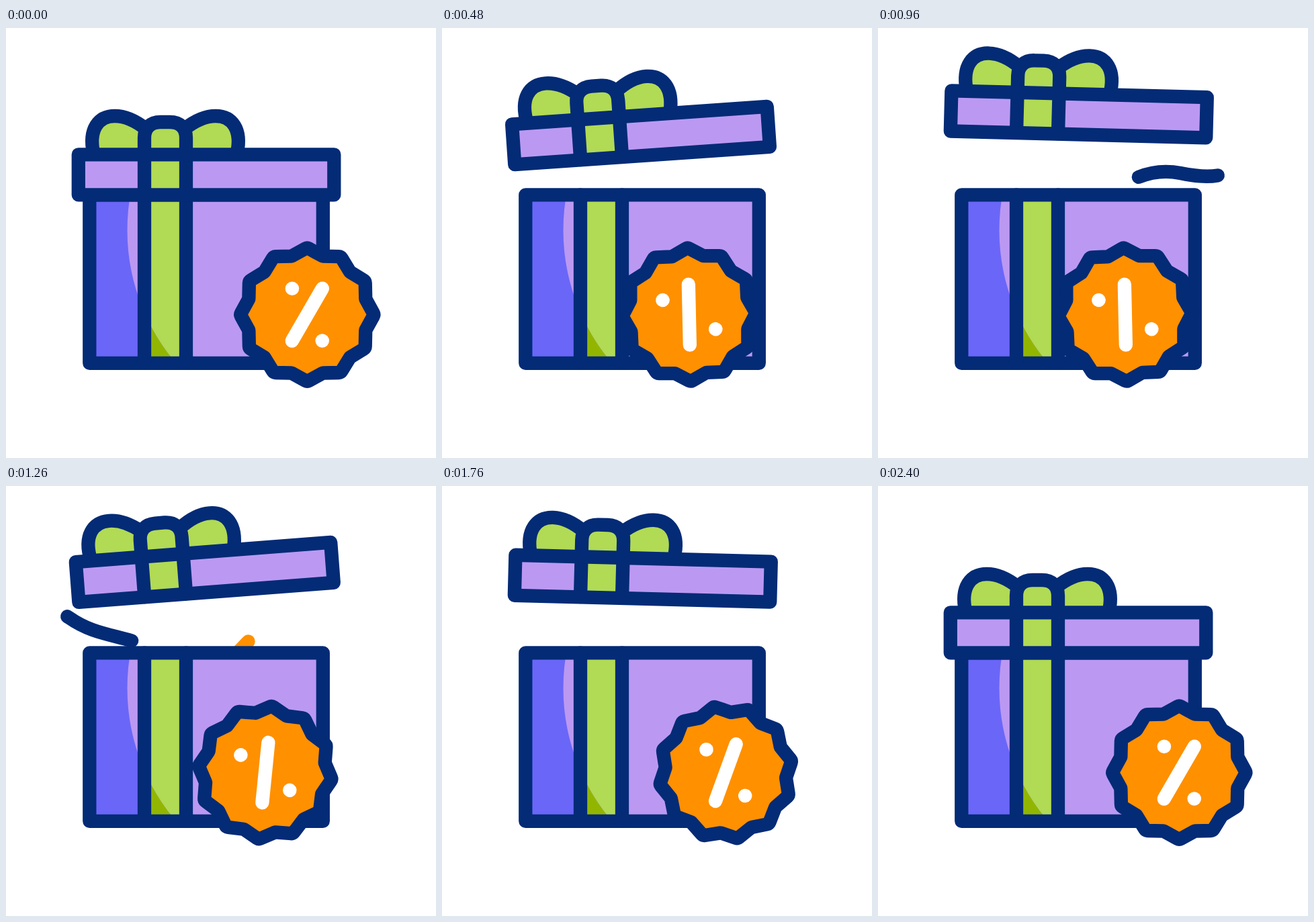
Recreate the animation shown at these times as an HTML page with a canvas. Size 640x640 px, loop 2.42 s.

```html
<!DOCTYPE html>
<html lang="en">
<head>
<meta charset="utf-8">
<title>Gift box</title>
<style>
  html, body { margin: 0; width: 100%; height: 100%; overflow: hidden; background: #fff; }
  canvas { display: block; width: 640px; height: 640px; }
</style>
</head>
<body>
<canvas id="stage" width="640" height="640"></canvas>
<script>
const ctx = document.getElementById('stage').getContext('2d');
const LOOP = 2420, STEP = 20, LINE = 20.3;
const NAVY = '#042b76', PURPLE = '#bb99f2', BLUE = '#6a66f8', GREEN = '#b1da55',
      OLIVE = '#92b600', ORANGE = '#ff9000', WHITE = '#fff';

const clamp = v => Math.min(1, Math.max(0, v));
const ease = v => { const u = clamp(v); return u * u * (3 - 2 * u); };
const rad = deg => deg * Math.PI / 180;

// Eased interpolation through [time, value] keys.
function track(keys, t) {
  for (let i = 1; i < keys.length; i++) {
    const [t0, a] = keys[i - 1], [t1, b] = keys[i];
    if (t <= t1) return a + (b - a) * ease((t - t0) / (t1 - t0));
  }
  return keys[keys.length - 1][1];
}

const lidTilt = [[0, 0], [400, -5], [800, 5], [1200, -5], [1600, 5], [2000, -5], [2400, 0]];
const lidLift = [[0, 0], [800, 90], [1600, 90], [2400, 0]];
const badgeRoll = [[0, 0], [600, 1], [2400, 0]];

function makeStreamer(color, start, end, d) {
  const path = document.createElementNS('http://www.w3.org/2000/svg', 'path');
  path.setAttribute('d', d);
  return { color, start, end, shape: new Path2D(d), length: path.getTotalLength() };
}

const streamers = [
  makeStreamer(ORANGE, 460, 940, 'M270 286 Q163.5 179 57 257'),
  makeStreamer(NAVY, 720, 1200, 'M335 258 C372 222 410 208 450 216 S520 226 562 190'),
  makeStreamer(NAVY, 980, 1520, 'M243 258 C224 242 206 235 186 230 C150 220 124 217 94 196 Q72 182 53 164'),
  makeStreamer(ORANGE, 1188, 1588, 'M335 258 L361 231 C410 188 490 190 562 240')
];

const loopShape = new Path2D('M130.5 188 C122 150 138 131 162 131 C178 131 194 139 208 150 V188');
const loopLine = new Path2D('M130.5 188 C122 150 138 131 162 131 C178 131 194 139 208 150');
const knot = new Path2D('M206 248 V163 C206 149 215 140 230 140 H244 C259 140 268 149 268 163 V248');
const badge = starPath(12, 99.7, 90);

function starPath(points, outer, inner) {
  const p = new Path2D();
  const at = i => {
    const a = i * Math.PI / points, r = i % 2 ? inner : outer;
    return [r * Math.sin(a), -r * Math.cos(a)];
  };
  const [x0, y0] = at(0), [x1, y1] = at(1);
  p.moveTo((x0 + x1) / 2, (y0 + y1) / 2);
  for (let i = 1; i <= points * 2; i++) p.arcTo(...at(i), ...at(i + 1), i % 2 ? 2 : 5);
  p.closePath();
  return p;
}

function stroke(path, color = NAVY) {
  ctx.strokeStyle = color;
  ctx.stroke(path);
}

function fill(path, color) {
  ctx.fillStyle = color;
  ctx.fill(path);
}

function rect(x0, y0, x1, y1) {
  const p = new Path2D();
  p.rect(x0, y0, x1 - x0, y1 - y0);
  return p;
}

function line(x0, y0, x1, y1, color) {
  const p = new Path2D();
  p.moveTo(x0, y0);
  p.lineTo(x1, y1);
  stroke(p, color);
}

function dot(x, y, r) {
  const p = new Path2D();
  p.arc(x, y, r, 0, Math.PI * 2);
  fill(p, WHITE);
}

function drawStreamer({ color, start, end, shape, length }, t) {
  const u = (t - start) / (end - start);
  if (u <= 0 || u >= 1) return;
  const head = ease(u / 0.75), tail = ease((u - 0.25) / 0.75);
  ctx.setLineDash([length * (head - tail), length * 3]);
  ctx.lineDashOffset = -length * tail;
  stroke(shape, color);
  ctx.setLineDash([]);
}

function drawBox() {
  const body = rect(124.3, 248.4, 471.8, 498.8);
  const ribbon = rect(206, 248.4, 268, 498.8);
  fill(body, BLUE);
  fill(ribbon, OLIVE);
  ctx.save();
  ctx.beginPath();
  ctx.arc(486.5, 301, 306, 0, Math.PI * 2);
  ctx.clip();
  fill(body, PURPLE);
  fill(ribbon, GREEN);
  ctx.restore();
  stroke(body);
  line(206, 248.4, 206, 498.8, NAVY);
  line(268, 248.4, 268, 498.8, NAVY);
}

function drawLid(t) {
  ctx.save();
  ctx.translate(298, 248 - track(lidLift, t));
  ctx.rotate(rad(track(lidTilt, t)));
  ctx.translate(-298, -248);
  for (const side of [1, -1]) {
    ctx.save();
    ctx.translate(237, 0);
    ctx.scale(side, 1);
    ctx.translate(-237, 0);
    fill(loopShape, GREEN);
    stroke(loopLine);
    ctx.restore();
  }
  const rim = rect(107.8, 188.3, 488.3, 248.4);
  fill(rim, PURPLE);
  fill(knot, GREEN);
  stroke(knot);
  stroke(rim);
  ctx.restore();
}

function drawBadge(t) {
  const roll = track(badgeRoll, t);
  ctx.save();
  ctx.translate(448.3 - 89.8 * roll, 426.6);
  ctx.rotate(rad(-35 * roll));
  fill(badge, ORANGE);
  stroke(badge);
  line(22.6, -39, -22.6, 39, WHITE);
  dot(-22.4, -38.9, 10.3);
  dot(22.4, 38.9, 10.3);
  ctx.restore();
}

function draw(t) {
  ctx.fillStyle = WHITE;
  ctx.fillRect(0, 0, 640, 640);
  ctx.lineWidth = LINE;
  ctx.lineCap = ctx.lineJoin = 'round';
  streamers.forEach(s => drawStreamer(s, t));
  drawBox();
  drawLid(t);
  drawBadge(t);
}

let origin;
function tick(now) {
  origin ??= now;
  const t = Math.max(0, now - origin) % LOOP;
  draw(Math.floor(t / STEP + 0.01) * STEP);
  requestAnimationFrame(tick);
}
draw(0);
requestAnimationFrame(tick);
</script>
</body>
</html>
```
